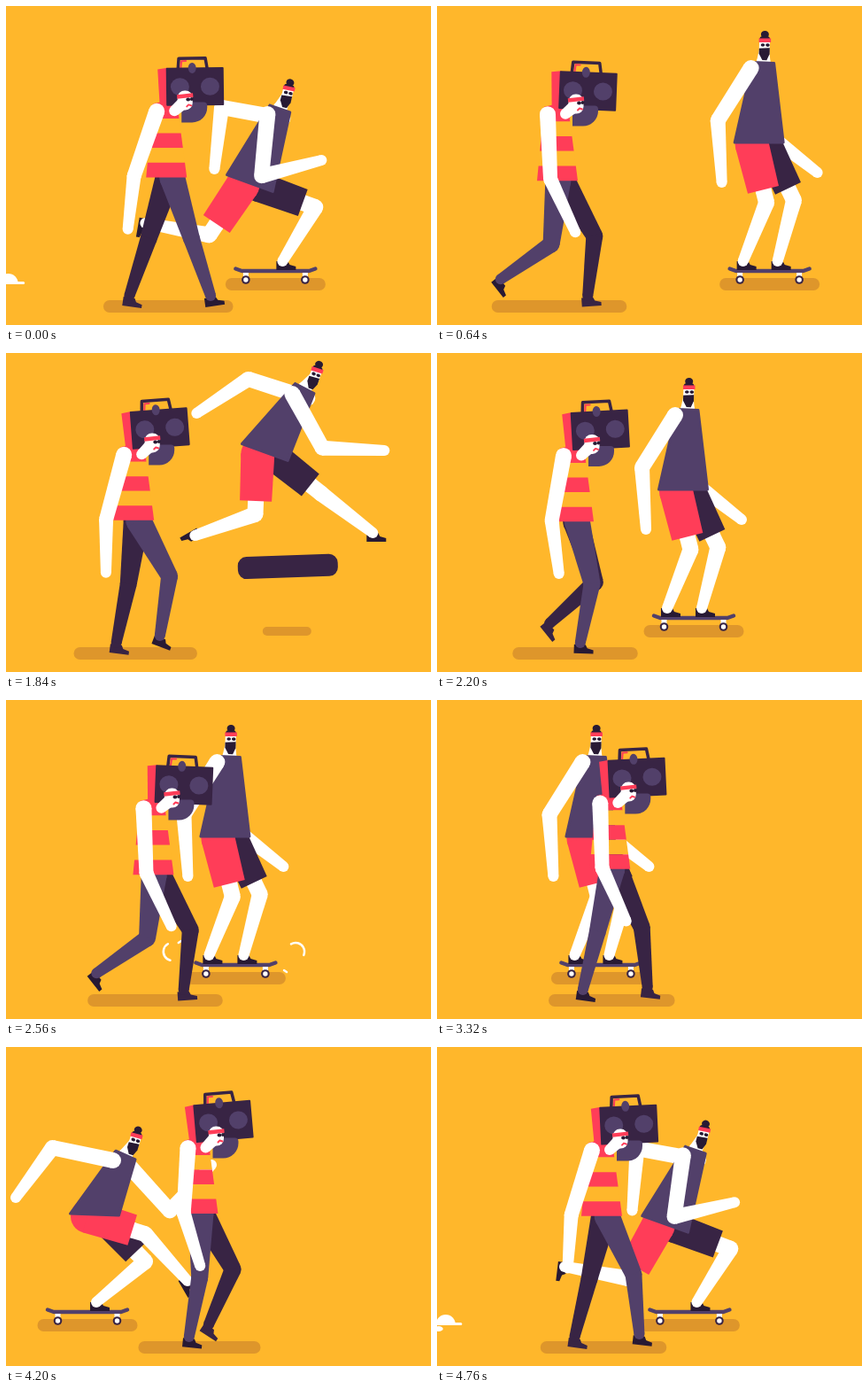
An HTML page with a canvas that plays this animation: 480x360 px, repeating every 4.8 s.

```html
<!DOCTYPE html>
<html>
<head>
<meta charset="utf-8">
<style>
html, body { margin: 0; width: 100%; height: 100%; overflow: hidden; background: #ffb72b; }
canvas { display: block; }
</style>
</head>
<body>
<canvas id="stage" width="480" height="360"></canvas>
<script>
const ctx = document.getElementById('stage').getContext('2d');
const { PI, sin, cos, min, max, hypot } = Math;
const LOOP = 4800, STEP = 960;
const BG = '#ffb72b', SHADE = '#de962b', PINK = '#ff3d58', DARK = '#382444',
      PLUM = '#52406a', SHOE = '#281a34', WHITE = '#fff';

// Skater poses: x counts from the middle of the board, y from the top of the stage
const PUSH = { neck: [5, 116], hip: [-29, 200], tilt: [20], nearHand: [52, 174],
  farHand: [-69, 184], nearFoot: [-147, 247, 100], farFoot: [8, 290] };
const STAND = { neck: [-7, 64], hip: [-12, 154], tilt: [0], nearHand: [-54, 199],
  farHand: [54, 188], nearFoot: [-30, 290, 0], farFoot: [9, 290] };
const CROUCH = { neck: [-2, 88], hip: [-15, 174], tilt: [7], nearHand: [-53, 198],
  farHand: [58, 188], nearFoot: [-28, 290, 0], farFoot: [26, 290] };
const LEAP = { neck: [20, 40], hip: [-25, 112], tilt: [20], nearHand: [110, 110],
  farHand: [-102, 68], nearFoot: [-104, 208, 150], farFoot: [97, 205] };
const REACH = { neck: [43, 122], hip: [8, 189], tilt: [2], nearHand: [-81, 170],
  farHand: [140, 133], nearFoot: [113, 266, 60], farFoot: [10, 290] };
const KICK = { neck: [40, 122], hip: [0, 198], tilt: [12], nearHand: [20, 205],
  farHand: [30, 195], nearFoot: [-10, 318, 25], farFoot: [9, 290] };
const ROUTINE = [[0, PUSH], [560, STAND], [1000, STAND], [1320, CROUCH], [1480, CROUCH],
  [1840, LEAP], [2200, STAND], [3600, STAND], [4200, REACH], [4480, KICK], [LOOP, PUSH]];

const progress = (t, from, to) => min(1, max(0, (t - from) / (to - from)));
const smooth = u => u * u * (3 - 2 * u);
const mix = (a, b, u) => a + (b - a) * u;
const toward = (a, b, u) => a.map((v, i) => mix(v, b[i], u));
const shift = ([x, y], dx, dy) => [x + dx, y + dy];

function poly(color, points) {
  ctx.fillStyle = color;
  ctx.beginPath();
  points.forEach(p => ctx.lineTo(...p));
  ctx.fill();
}
function line(color, width, points, cap = 'round') {
  ctx.strokeStyle = color;
  ctx.lineWidth = width;
  ctx.lineCap = cap;
  ctx.beginPath();
  points.forEach(p => ctx.lineTo(...p));
  ctx.stroke();
}
function oval(color, x, y, rx, ry = rx) {
  ctx.fillStyle = color;
  ctx.beginPath();
  ctx.ellipse(x, y, rx, ry, 0, 0, 7);
  ctx.fill();
}
function box(color, x, y, w, h, r = 0) {
  ctx.fillStyle = color;
  ctx.beginPath();
  ctx.roundRect(x, y, w, h, r);
  ctx.fill();
}
const shadow = (x, y, halfW, halfH) => box(SHADE, x - halfW, y - halfH, 2 * halfW, 2 * halfH, halfH);
function taper(color, [ax, ay], [bx, by], ra, rb) {
  const d = hypot(bx - ax, by - ay) || 1, nx = (ay - by) / d, ny = (bx - ax) / d;
  poly(color, [[ax + nx * ra, ay + ny * ra], [bx + nx * rb, by + ny * rb],
               [bx - nx * rb, by - ny * rb], [ax - nx * ra, ay - ny * ra]]);
}
function limb(color, points, radii) {
  points.forEach((p, i) => {
    oval(color, ...p, radii[i]);
    if (i) taper(color, points[i - 1], p, radii[i - 1], radii[i]);
  });
}
// Middle joint of a two-bone limb; side picks the way it bends
function joint([ax, ay], [bx, by], upper, lower, side) {
  const dx = bx - ax, dy = by - ay, d = hypot(dx, dy);
  const along = min(upper, (d * d + upper * upper - lower * lower) / (2 * d));
  const out = side * Math.sqrt(upper * upper - along * along);
  return [ax + (dx * along - dy * out) / d, ay + (dy * along + dx * out) / d];
}
function at(x, y, degrees, draw) {
  ctx.save();
  ctx.translate(x, y);
  ctx.rotate(degrees * PI / 180);
  draw();
  ctx.restore();
}
const foot = (color, x, y, angle) => at(x, y, angle, () =>
  poly(color, [[-7, -2], [6, -2], [8, 2], [15, 4], [15, 8], [-7, 8]]));

function walkerLeg(color, shoe, x, hipY, phase) {
  const a = 2 * PI * phase, swing = max(0, -sin(a));
  const reach = -5 + 55 * cos(a - .59) + 11 * cos(2 * a + .6);
  const ankle = [x + reach, 331 - 23 * swing ** 1.5];
  const hip = [x + 4 + reach * .05, hipY];
  foot(shoe, ...ankle, 55 * swing - 8 * cos(a));
  limb(color, [hip, joint(hip, ankle, 72, 72, -1), shift(ankle, 0, -4)], [14.5, 9.5, 6]);
}

function walker(t) {
  const phase = t / STEP, bob = cos(4 * PI * (phase - .12));
  const back = smooth(progress((t + 460) % LOOP, 0, 1000));
  const forth = smooth(progress(t, 1100, 4340) ** 1.1);
  const x = t > 1000 && t < 4340 ? mix(136, 217, forth) : mix(217, 136, back);
  const hipY = 193 + 5 * bob, top = 110 + 4.5 * bob;

  shadow(x + 2, 339, 73 + 4 * bob, 7);
  walkerLeg(DARK, DARK, x, hipY, phase + .5);
  walkerLeg(PLUM, SHOE, x, hipY, phase);

  const edge = f => [x - 15 - 8 * f, x + 12 + 11 * f, mix(top, hipY, f)];
  for (let i = 0; i < 5; i++) {
    const [l0, r0, y0] = edge(i / 5), [l1, r1, y1] = edge((i + 1) / 5);
    poly(i % 2 ? BG : PINK, [[l0, y0], [r0, i ? y0 : y0 - 6], [r1, y1], [l1, y1]]);
  }

  const head = [x + 21, 103 + 5.5 * bob], shoulder = [x - 11, 118.5 + 4.5 * bob];
  at(x + 31 + 3 * bob, 90.5 + 6.5 * bob, -1 + 4 * bob, boombox);
  box(PLUM, head[0] - 4, head[1] + 5, 29, 23, [0, 4, 17, 0]);
  limb(WHITE, [shift(head, -2, 6), [x + 9, top + 8]], [7, 6]);
  at(...head, 0, () => {
    box(WHITE, -8.5, -8, 17, 22, 8);
    line(PINK, 4.5, [[-9, -1], [9, -3]], 'butt');
    oval(SHOE, 3.5, 2, 2.4, 2);
    oval(SHOE, 7.5, 1.5, 1.8, 2);
    line(PINK, 2, [[2, 10], [4, 8], [7, 9]]);
  });

  const hand = 1 - 37 * cos(2 * PI * (phase - .07)), elbow = hand * .45 - 11;
  limb(WHITE, [shoulder, shift(shoulder, elbow, 73), shift(shoulder, hand, 133)], [9, 8, 6]);
}

function boombox() {
  line(DARK, 3.5, [[-18, -20], [-17, -32], [13, -32], [15, -20]]);
  line(PINK, 2, [[-15, -20], [-14, -29], [-9, -29]]);
  poly(PINK, [[-41, -20], [-30, -21.5], [-30, 21.5], [-39, 21]]);
  box(DARK, -31.5, -21.5, 65, 43, 1);
  oval(PLUM, -16, 0, 10.5, 10);
  oval(PLUM, 18, 0, 10.5, 10);
  oval(PLUM, -2, -21, 4.5, 6);
}

// The skater dashes right, then drifts back to the left
function skaterX(t) {
  const dash = smooth(progress((t + 550) % LOOP, 0, 820));
  const drift = progress(t, 600, 4150) ** 1.5;
  return t > 600 && t < 4250 ? mix(376, 92, drift) : mix(92, 376, dash);
}

function skaterPose(t, x) {
  const i = ROUTINE.findIndex(([time]) => time > t);
  const [t0, from] = ROUTINE[i - 1], [t1, to] = ROUTINE[i];
  const u = smooth(progress(t, t0, t1)), pose = {};
  for (const part in from) {
    pose[part] = toward(from[part], to[part], u);
    if (part !== 'tilt') pose[part][0] += x;
  }
  return pose;
}

function skater(t) {
  const x = skaterX(t), { neck, hip, tilt: [tilt], ...ends } = skaterPose(t, x);
  const lean = Math.atan2(neck[0] - hip[0], hip[1] - neck[1]);
  board(t, x);

  const arm = (hand, shoulder) =>
    limb(WHITE, [shoulder, joint(shoulder, hand, 70, 70, 1), hand], [9, 8.5, 6]);
  const leg = (color, root, [ax, ay, angle = 0], width) => {
    const knee = joint(root, [ax, ay], 68, 73, -1), hem = toward(root, knee, .78);
    foot(SHOE, ax, ay, angle);
    limb(WHITE, [hem, knee, [ax, ay - 2]], [9, 9, 6]);
    oval(color, ...root, width);
    taper(color, root, hem, width, width - 1);
  };
  arm(ends.farHand, shift(neck, 3, 11));
  leg(DARK, shift(hip, 10, 4), ends.farFoot, 17);
  leg(PINK, shift(hip, -8, 2), ends.nearFoot, 19);

  const a = lean * 1.2, head = shift(neck, 19 * sin(a), -19 * cos(a));
  limb(WHITE, [neck, head], [8, 5]);
  const bar = ([cx, cy], half, angle) => [-half, half].map(h => [cx + h * cos(angle), cy + h * sin(angle)]);
  const torso = [...bar(neck, 12, lean * .85), ...bar(hip, 27.5, tilt * PI / 180).reverse()];
  poly(PLUM, torso);
  line(PLUM, 3, [...torso, torso[0]]);
  at(...head, lean * 36, skaterHead);
  arm(ends.nearHand, shift(neck, -14, 6));
}

function skaterHead() {
  oval(SHOE, 0, -13, 4.5, 4);
  box(SHOE, -6, -11, 12, 8, 4);
  box(WHITE, -6, -7, 12, 12, 1);
  poly(SHOE, [[-6, 3], [6, 2], [6, 9], [3, 16], [-2, 16], [-6, 9]]);
  line(PINK, 4.5, [[-6.5, -6], [7, -6.5]], 'butt');
  oval(SHOE, -2, -1, 2.3, 1.8);
  oval(SHOE, 3.5, -1, 2.3, 1.8);
}

function board(t, x) {
  const u = progress(t, 1560, 2120), air = 4 * u * (1 - u);
  shadow(x, 314, 56.5 - 29 * air, 7 - 2 * air);
  at(x, 298 - 57 * air, -2 * air, () => {
    if (air > .15) {
      const half = 3 + 9.5 * air, length = 98 + 15 * air;
      box(DARK, 1 - length / 2, -half, length, 2 * half, min(half, 10));
      return;
    }
    line(PLUM, 4.5, [[-45, -1.5], [-38, 1], [38, 1], [45, -1.5]]);
    for (const wheel of [-33.5, 33.5]) {
      box(WHITE, wheel - 3, 3, 6, 5);
      oval(DARK, wheel, 11, 4.8);
      oval(WHITE, wheel, 11, 2.7);
    }
  });
}

// Sparks thrown out on landing
function sparks(t) {
  const u = progress(t, 2300, 2700), x = skaterX(t), reach = 35 + 50 * u, width = 2.8 * sin(PI * u);
  if (u === 0 || u === 1) return;
  const arc = (cx, from, to) => {
    ctx.beginPath();
    ctx.arc(cx, 284, 10, from, to);
    ctx.stroke();
  };
  line(WHITE, width, [[x - reach + 3, 274], [x - reach + 6, 272]]);
  line(WHITE, width, [[x + reach - 13, 305], [x + reach - 10, 307]]);
  arc(x - reach - 4, 1.8, 4.2);
  arc(x + reach, -2.1, .4);
}

// Dust left behind by the kick
function dust(t) {
  const age = (t - 4440 + LOOP) % LOOP, size = min(1, age / 120);
  if (age > 600) return;
  at(10 - (age - 320) * .18, 314, 0, () => {
    ctx.scale(size, size);
    ctx.fillStyle = WHITE;
    ctx.beginPath();
    ctx.arc(0, -1, 11, PI, 0);
    ctx.fill();
    line(WHITE, 3, [[-16, -1.5], [17, -1.5]]);
    oval(WHITE, -8, 4, 5, 3);
  });
}

function frame(now) {
  const t = now % LOOP;
  ctx.fillStyle = BG;
  ctx.fillRect(0, 0, 480, 360);
  ctx.lineJoin = 'round';
  dust(t);
  skater(t);
  sparks(t);
  walker(t);
  requestAnimationFrame(frame);
}
requestAnimationFrame(frame);
</script>
</body>
</html>
```
